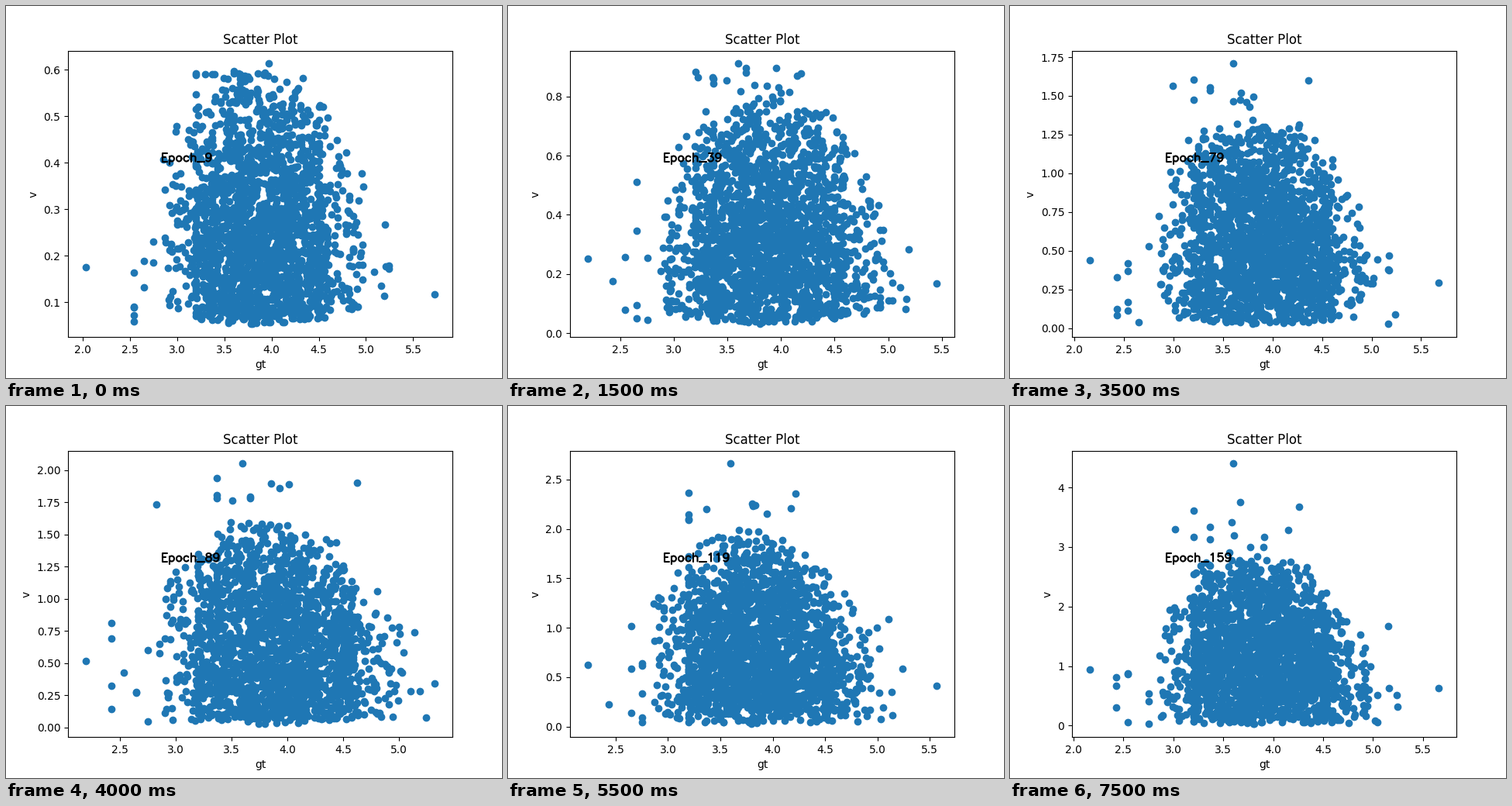
Recreate the animation shown at these times as a matplotlib script. Size 640 by 480 pixels, loop 8 s.

```python
import numpy as np
import matplotlib.pyplot as plt
from matplotlib.animation import FuncAnimation
from matplotlib.collections import LineCollection

W, H, DPI = 640, 480, 100
FRAMES, STEP = 16, 500

# Extent of the data at key steps, interpolated in between
KEYS = [0, 2, 4, 5, 7, 8, 9, 11, 13, 15]
LEFT = [2.03, 2.235, 2.15, 2.1, 2.15, 2.195, 2.2, 2.23, 2.23, 2.16]
RIGHT = [5.73, 5.29, 5.62, 5.55, 5.68, 5.32, 5.5, 5.57, 5.69, 5.66]
TOP = [.597, .853, .968, 1.18, 1.708, 2.05, 2.43, 2.66, 3.41, 4.4]

COLUMNS = [3.2, 3.37, 3.67, 4.5]
SPARSE = [2.43, 2.54, 2.65, 2.75]


def cloud(k):
    rng = np.random.default_rng(40 + k)
    t = k / (FRAMES - 1)
    left, right, top = (np.interp(k, KEYS, v) for v in (LEFT, RIGHT, TOP))
    low = .025 + .028 * np.exp(-k / 2)
    body = top * (.98 - .27 * t)

    # Dense body under a dome that leans left over time
    x = np.concatenate([rng.normal(3.9, .42, 1150),
                        rng.uniform(3.2, 4.6, 560),
                        rng.uniform(2.9, 4.95, 210),
                        rng.choice(COLUMNS, 120)])
    x = x[(x > 2.85) & (x < 5.02)]
    dome = np.minimum(((x - 3.87) / .95) ** 2, 1.2)
    cap = body * (1 - .33 * dome - .1 * t * (x - 3.6))
    floor = low + .04 * (1 - t) * body * dome
    y = floor + cap * rng.beta(1.25 + .2 * t, 2.05, x.size)

    # Thin fringes at the sides and above
    sx = np.append(rng.choice(SPARSE, 9), 5 + .26 * rng.random(7))
    sy = low + .6 * body * rng.beta(1, 2.2, sx.size)
    tx = np.append(rng.choice(COLUMNS[:3], 5), rng.normal(3.7, .35, 6))
    ty = body + (top - body) * rng.beta(1, 2.5, tx.size) * .9

    # Extremes that set the axis limits
    ex = [left, right, 3.6, 3.8]
    ey = [.3 * body, .2 * body, top, low]
    return np.concatenate([x, sx, tx, ex]), np.concatenate([y, sy, ty, ey])


def arc(cx, cy, rx, ry, a0=0, a1=360):
    a = np.radians(np.linspace(a0, a1, 17))
    return list(zip(cx + rx * np.cos(a), cy + ry * np.sin(a)))


# Single-stroke letters: advance width, then polylines (y up from baseline)
GLYPHS = {
    "E": (19, [(17, 21), (4, 21), (4, 0), (17, 0)], [(4, 11), (12, 11)]),
    "p": (19, [(4, 14), (4, -7)], arc(9.5, 7, 6.5, 7, 148, -148)),
    "o": (19, arc(9.5, 7, 6.5, 7)),
    "c": (18, arc(9.5, 7, 6.5, 7, 36, 324)),
    "h": (19, [(4, 21), (4, 0)], arc(9.5, 10, 5.5, 4, 180, 0) + [(15, 0)]),
    "_": (20, [(1, 0), (19, 0)]),
    "0": (20, arc(10, 10.5, 7, 10.5)),
    "1": (20, [(6, 17), (8, 18), (11, 21), (11, 0)]),
    "2": (20, arc(10, 15, 6, 6, 180, -30) + [(3, 0), (17, 0)]),
    "3": (20, [(5, 21), (16, 21), (10, 13)] + arc(10, 6.5, 7, 6.5, 90, -160)),
    "4": (20, [(13, 0), (13, 21), (3, 7), (18, 7)]),
    "5": (20, [(15, 21), (5, 21), (4, 12)] + arc(10, 7, 7, 7, 135, -155)),
    "6": (20, arc(10.5, 6.5, 6.5, 6.5), arc(11.5, 11, 7.5, 10, 60, 200)),
    "7": (20, [(3, 21), (17, 21), (7, 0)]),
    "8": (20, arc(10, 16.5, 6, 4.5), arc(10, 6, 7, 6)),
    "9": (20, arc(9.5, 14.5, 6.5, 6.5), arc(8.5, 10, 7.5, 10, 20, -130)),
}


def strokes(text, x=199, y=200, scale=.5):
    out = []
    for ch in text:
        width, *lines = GLYPHS[ch]
        for line in lines:
            out.append(np.array(line) * (scale, -scale) + (x, y))
        x += width * scale
    return out


fig, ax = plt.subplots(figsize=(W / DPI, H / DPI), dpi=DPI)
overlay = fig.add_axes([0, 0, 1, 1], zorder=5)
overlay.axis("off")
overlay.set(xlim=(-.5, W - .5), ylim=(H - .5, -.5))
label = LineCollection([], colors="black", linewidths=2.1 * 72 / DPI,
                       capstyle="round", joinstyle="round")
overlay.add_collection(label, autolim=False)


def draw(k):
    ax.clear()
    ax.scatter(*cloud(k))
    ax.set(title="Scatter Plot", xlabel="gt", ylabel="v")
    label.set_segments(strokes(f"Epoch_{10 * k + 9}"))


anim = FuncAnimation(fig, draw, frames=FRAMES, init_func=lambda: None,
                     interval=STEP, repeat=True, repeat_delay=0)
plt.show()
```
